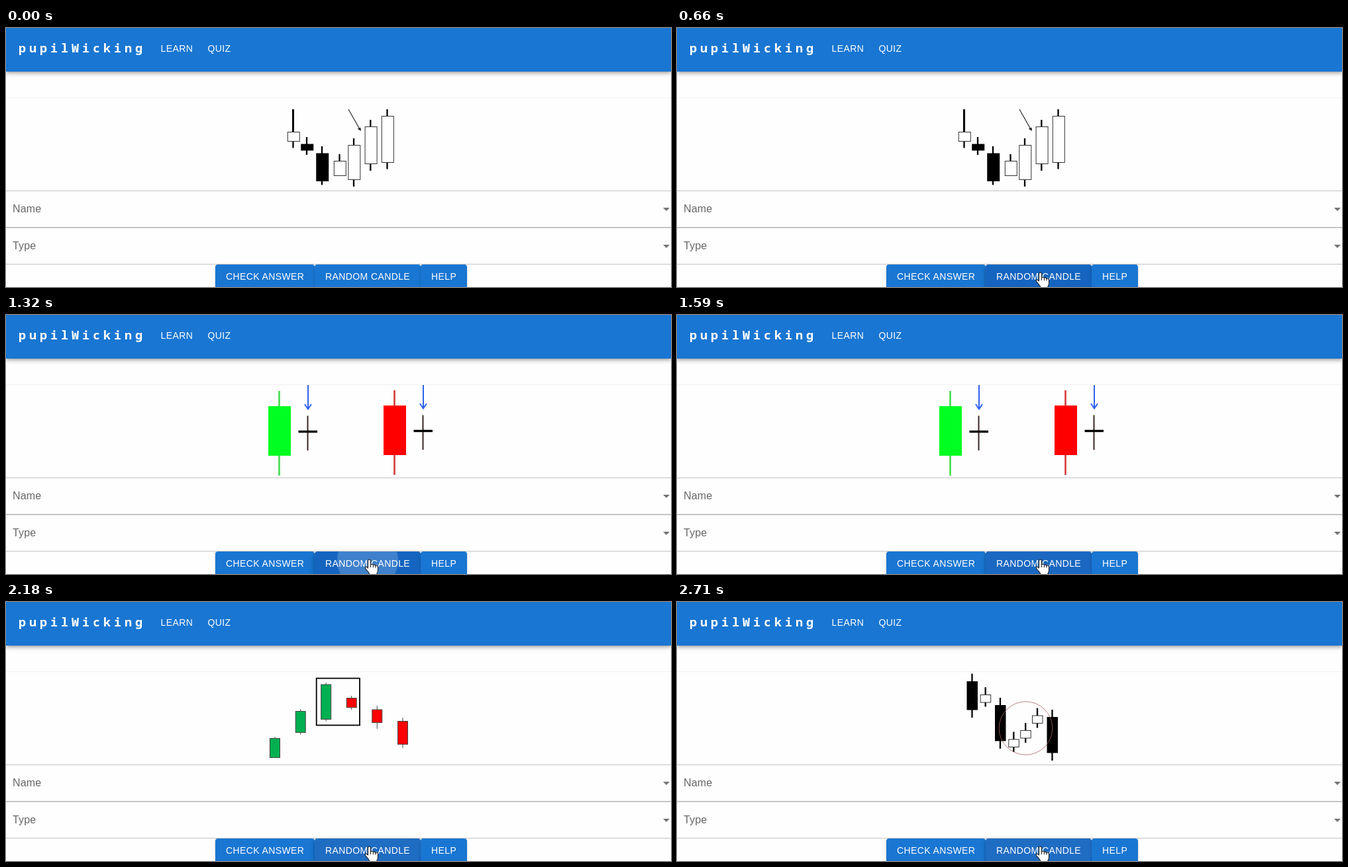
These frames come from a looping animation (1004x392 px, 2.78 s). An HTML page:

```html
<!DOCTYPE html>
<html lang="en">
<head>
<meta charset="utf-8">
<title>Candle quiz</title>
<style>
html, body { margin: 0; width: 100%; height: 100%; overflow: hidden; background: #fff; }
#stage { position: relative; width: 1004px; height: 392px; overflow: hidden; background: #fefefe; }
#bar { position: absolute; left: 0; top: 0; width: 1004px; height: 66px; background: #1976d2;
  box-shadow: 0 2px 4px -1px rgba(0,0,0,.2), 0 4px 5px rgba(0,0,0,.14), 0 1px 10px rgba(0,0,0,.12); }
.btn { position: absolute; top: 358px; height: 36.5px; border-radius: 4px; overflow: hidden; }
#ripple { position: absolute; border-radius: 50%; background: #fff; }
svg { position: absolute; left: 0; top: 0; }
text { font-family: "Liberation Sans", Arial, sans-serif; }
.caps { font-size: 14px; letter-spacing: .4px; fill: #fff; }
.label { font-size: 16px; letter-spacing: .15px; fill: #666; }
.brand { font: 700 18.5px "Noto Sans Mono", monospace; letter-spacing: 4.9px; fill: #fff; }
</style>
</head>
<body>
<div id="stage">
  <div id="bar"></div>
  <div class="btn" id="check" style="left:316px;width:150px"></div>
  <div class="btn" id="random" style="left:466px;width:160px"><div id="ripple"></div></div>
  <div class="btn" id="help" style="left:626px;width:70px"></div>
  <svg width="1004" height="392" viewBox="0 0 1004 392">
    <text class="brand" x="19" y="37">pupilWicking</text>
    <text class="caps" x="233.5" y="36">LEARN</text>
    <text class="caps" x="304.5" y="36">QUIZ</text>
    <path d="M0 105.5H1004" stroke="#f3f3f3"/>
    <path d="M0 246.5H1004M0 301.5H1004M0 302.5H1004M0 357.5H1004" stroke="#c4c4c4"/>
    <text class="label" x="10" y="279">Name</text>
    <text class="label" x="10" y="335">Type</text>
    <path d="M992 272h10l-5 5zM992 328h10l-5 5z" fill="#757575"/>
    <g id="pics"></g>
    <text class="caps" x="332" y="381">CHECK ANSWER</text>
    <text class="caps" x="482" y="381">RANDOM CANDLE</text>
    <text class="caps" x="642" y="381">HELP</text>
    <circle id="spot" cx="545.5" cy="369" r="12" fill="#ffeb00" fill-opacity=".55"/>
    <g id="cursor" stroke="#222" stroke-width="1.1" stroke-linejoin="round" fill="#fff">
      <path id="arrow" d="M6 2V18.5L9.8 15 12.3 20.8 15 19.6 12.5 14H17.6Z"/>
      <g id="hand">
        <path d="M5.5 14V3C5.5.6 9.5.6 9.5 3V9C10.5 7.8 13 8 13.4 9.6 14.6 8.6 16.6 9 17 10.6 18.4 9.8 20.5 10.6 20.5 12.6V18C20.5 20 18.5 22 18.5 24.5H8.5C8 21 3.5 17.5 1.5 14.6.6 12.8 3 11.4 4.2 12.8Z"/>
        <path d="M9.5 9V13M13.4 9.6V13.2M17 10.6V13.6" fill="none"/>
      </g>
    </g>
  </svg>
</div>
<script>
const LOOP = 2780, STEP = 67;
const $ = id => document.getElementById(id);

// ---- pictures ----
const line = (d, c, w) => `<path d="${d}" fill="none" stroke="${c}" stroke-width="${w}"/>`;
const rect = (x1, y1, x2, y2, fill, stroke = 'none', w = 1) =>
  `<rect x="${x1}" y="${y1}" width="${x2 - x1}" height="${y2 - y1}" fill="${fill}" stroke="${stroke}" stroke-width="${w}"/>`;

// wick x, wick top, body top, body bottom, wick bottom
const candle = (left, width, fill, edge, wick) => ([x, top, y1, y2, bottom]) =>
  line(`M${x} ${top}V${bottom}`, wick[0], wick[1]) + rect(left(x), y1, left(x) + width, y2, fill, edge);

function mono(width, shift) {
  const make = fill => candle(x => x - shift, width, fill, fill === '#000' ? '#000' : '#333', ['#000', 2.3]);
  return { black: make('#000'), white: make('#fff') };
}

function rally() {
  const { black, white } = mono(18, 8.2);
  return line('M433.5 123V157', '#000', 3) +
    white([433.5, 140, 157.5, 171.5, 181.5]) +
    black([454, 165, 176, 185, 192]) +
    black([477, 179, 190, 231.5, 237.5]) +
    white([503.5, 191, 201.5, 223.5, 223.5]) +
    white([525, 167, 177.5, 229.5, 240]) +
    white([550.3, 139, 149.5, 205.5, 216]) +
    white([575.5, 123, 133.5, 203.5, 213.5]) +
    line('M517 123L534.5 154', '#333', 1.3) +
    '<path d="M536 156L530.8 152.4 535.4 150.5Z" fill="#222"/>';
}

function pair() {
  const half = (x, y, body, wick) =>
    line(`M${x + 16.5} ${y - 23}V${y + 105}`, wick, 2.8) +
    rect(x, y, x + 34, y + 75, body) +
    line(`M${x + 60} 106V${y + 4}M${x + 55} ${y - 3}L${x + 60} ${y + 4.5}L${x + 65} ${y - 3}`, '#2f62f0', 2) +
    line(`M${x + 59.5} ${y + 14.5}V${y + 67}`, '#3a2424', 2) +
    line(`M${x + 45.5} ${y + 38.5}H${x + 74}`, '#000', 3.4);
  return half(396, 138, '#00ff21', '#4fdd58') + half(570, 137, '#f00', '#d64848');
}

function peak() {
  const make = fill => candle(x => x - 7.5, 15, fill, '#444', ['#444', 1]);
  const up = make('#00b050'), down = make('#f00');
  return up([406, 204, 206.5, 235.5, 235.5]) +
    up([444.7, 162.5, 165.5, 197.5, 200.5]) +
    up([483.2, 122, 125, 177.5, 180.5]) +
    down([521.7, 142, 145.5, 159.7, 163]) +
    down([560.3, 157, 163, 182.5, 192]) +
    down([599, 175, 180.5, 215.3, 221]) +
    rect(468.7, 115.5, 534, 186.5, 'none', '#000', 1.8);
}

function slide() {
  const { black, white } = mono(15.5, 7.5);
  return black([445.5, 108.5, 120.5, 163, 175]) +
    white([465.7, 129, 140.5, 152, 158.5]) +
    black([488, 145, 156.5, 210, 222]) +
    white([508.3, 196.5, 208, 219.5, 227]) +
    white([526.2, 183, 194.5, 206, 213]) +
    white([544, 160.5, 172, 183.5, 190.5]) +
    black([566.5, 163, 174.5, 228, 240]) +
    '<circle cx="526.5" cy="191" r="40.3" fill="none" stroke="#a86464" stroke-width=".8"/>';
}

const pics = [rally, pair, peak, slide].map(draw => {
  const g = document.createElementNS('http://www.w3.org/2000/svg', 'g');
  g.innerHTML = draw();
  $('pics').appendChild(g);
  return g;
});

// ---- timing ----
const clamp = v => Math.max(0, Math.min(1, v));
const mix = (a, b, k) => a + (b - a) * k;

// cubic-bezier(.4, 0, .2, 1)
function ease(x) {
  x = clamp(x);
  let lo = 0, hi = 1, t = x;
  for (let i = 0; i < 22; i++) {
    t = (lo + hi) / 2;
    const u = 1 - t;
    if (1.2 * u * u * t + .6 * u * t * t + t * t * t < x) lo = t; else hi = t;
  }
  return 3 * (1 - t) * t * t + t * t * t;
}
const pulse = (t, on, off) => ease((t - on) / 250) - ease((t - off) / 250);

// Bursts of motion are sampled in steps and then held: start, number of steps
const enter = [260, 6], clicks = [[1120, 7], [1780, 7], [2310, 6]];
const sample = (t, [start, last]) =>
  t < start ? -1 : Math.min(last, Math.floor((t - start + 2) / (STEP - .2)));

// ---- buttons ----
const IDLE = [[3, 1, -2], [2, 2, 0], [1, 5, 0]];
const HOVER = [[2, 4, -1], [4, 5, 0], [1, 10, 0]];
const PRESS = [[5, 5, -3], [8, 10, 1], [3, 14, 2]];
const ALPHA = [.2, .14, .12];

function paint(id, hover, press = 0) {
  const s = $(id).style;
  s.background = `rgb(${mix(25, 21, hover)},${mix(118, 101, hover)},${mix(210, 192, hover)})`;
  s.boxShadow = ALPHA.map((a, i) => {
    const v = IDLE[i].map((n, j) => mix(mix(n, HOVER[i][j], hover), PRESS[i][j], press));
    return `0 ${v[0]}px ${v[1]}px ${v[2]}px rgba(0,0,0,${a})`;
  }).join();
}

function ripple(ms) {
  const s = $('ripple').style;
  const grow = ease(ms / 550), r = 85 * grow;
  s.left = 80 - r + 'px';
  s.top = 13 - r + 'px';
  s.width = s.height = 2 * r + 'px';
  s.opacity = ms < 0 ? 0 : mix(.1, .3, grow) * (1 - ease((ms - 90) / 550));
}

const show = (el, on) => { el.style.display = on ? '' : 'none'; };

function render(t) {
  const step = sample(t, enter), moved = step * STEP;
  const left = 1 - Math.max(0, step) / 6;
  const x = 541 + 205 * left * left, y = 369 + 9 * left * left;
  show($('cursor'), step >= 0);
  show($('arrow'), step === 0);
  show($('hand'), step > 0);
  $('cursor').setAttribute('transform', `translate(${x} ${y})`);

  let pic = 0, beat = -1;
  clicks.forEach((c, i) => {
    const n = sample(t, c);
    if (n >= 0) beat = n;
    if (n >= 2) pic = i + 1;
  });
  const ms = beat * STEP;
  pics.forEach((g, i) => show(g, i === pic));
  show($('spot'), beat === 0 || beat === 1);
  ripple(ms);
  paint('check', 0);
  paint('random', step < 0 ? 0 : ease((moved - 150) / 250), beat < 0 ? 0 : pulse(ms + 80, 0, 170));
  paint('help', step < 0 ? 0 : pulse(moved, 60, 150));
}

const origin = performance.now();
function tick() {
  render((performance.now() - origin) % LOOP);
  requestAnimationFrame(tick);
}
tick();
</script>
</body>
</html>
```
